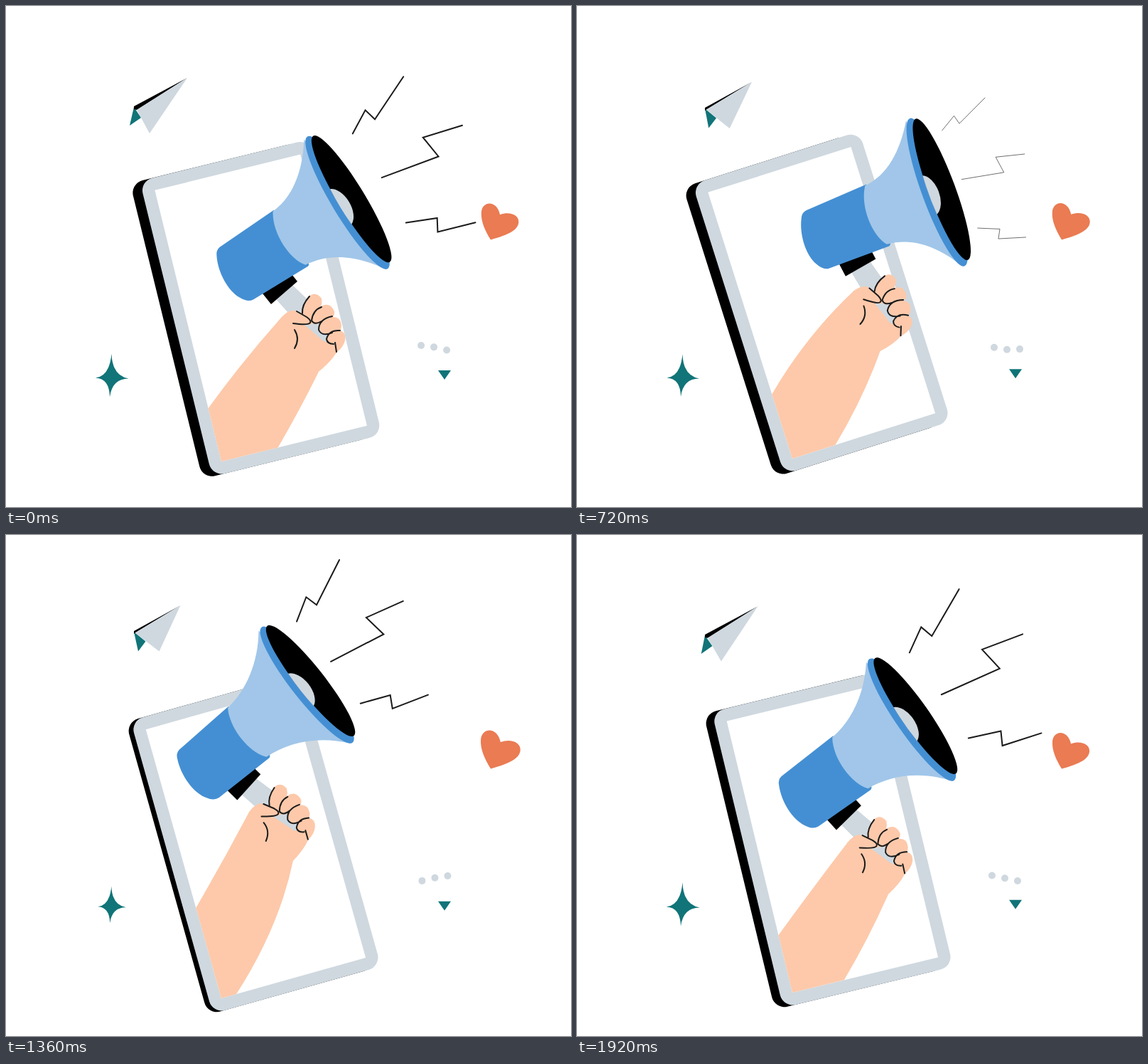
Recreate the animation shown at these times as an HTML page. Size 795 by 704 pixels, loop 2 s.

```html
<!DOCTYPE html>
<html lang="en">
<head>
<meta charset="utf-8">
<title>Megaphone</title>
<style>
  html, body { margin: 0; width: 100%; height: 100%; overflow: hidden; background: #fff; }
  svg { display: block; width: 795px; height: 704px; }
  .gray { fill: #cfd8df; }
  .blue { fill: #448fd3; }
  .sky { fill: #a1c6e9; }
  .skin { fill: #fdc9aa; }
  .teal { fill: #107478; }
  .coral { fill: #ea7b53; }
  .white { fill: #fff; }
  .ink { fill: none; stroke: #1b1b1b; stroke-width: 2; stroke-linecap: round; stroke-linejoin: round; }
  #bolts { stroke-linejoin: miter; }
</style>
</head>
<body>
<svg viewBox="0 0 795 704">
  <g id="plane">
    <path id="fold" class="teal"/>
    <path id="edge"/>
    <path id="wing" class="gray"/>
  </g>
  <path id="star" class="teal" d="M1-33Q2-2 25 2Q2 2-1.500 28Q-2 2-21.500 1Q-2-1 1-33Z"/>
  <g id="dots" class="gray"><circle r="5"/><circle r="5"/><circle r="5"/></g>
  <path id="arrow" class="teal" d="M608 0H626L617 13Z"/>
  <path id="heart" class="coral" d="M0 0C-8-13-14-26-13-39C-11-55 9-55 13-35C26-40 40-35 39-24C38-14 26-7 0 0Z"/>

  <!-- The origin is the lower left corner of the screen -->
  <g id="phone">
    <rect id="side" x="-17.500" y="-410" width="246" height="427.500" rx="18"/>
    <rect class="gray" x="-17.500" y="-410" width="246" height="427.500" rx="18"/>
    <rect class="white" y="-392.500" width="211" height="392.500"/>
  </g>

  <path id="arm" class="skin"/>
  <g id="hand">
    <path class="gray" d="M380 412L402 391L428 416L418 440L405 440Z"/>
    <path d="M361 404L402 377L410 387L373 419Z"/>
    <path class="skin" d="M387 438Q400 424 409 429L417 432Q416 419 426 408Q436 400 444 411Q445 417 443 422Q456 415 462 429Q463 433 460 437Q471 437 472 449Q472 453 470 456Q479 459 477 470Q475 479 465 487Q458 499 441 513L400 500Z"/>
    <path class="gray" d="M420 448Q429 448 431 446Q435 448 441 446Q440 457 447 461L454 462Q449 470 453 472Q447 473 441 466Z"/>
    <path class="ink" d="M427 408Q416 420 417 432M409 429L423 437Q430 442 428 445Q426 449 404 446M406 455Q414 468 406 481
      M444 423Q432 427 430 442Q434 449 444 443M459 436Q440 440 440 455Q444 465 459 459
      M470 456Q454 455 451 468Q452 475 461 475M463 473L465 486"/>
  </g>

  <!-- The origin is the joint of body and cone, the axis points right -->
  <g id="horn">
    <path class="blue" d="M2-46L-90-41Q-97-40-100-33C-111-12-112 18-103 34Q-97 46-88 46.500L2 46.500Q7 45 5 38Z"/>
    <path id="cone" class="sky"/>
    <g id="rim">
      <ellipse class="blue ring" cx="-2" cy="-1" rx="21"/>
      <ellipse class="ring" cx="5.500" cy="-2.500" rx="19"/>
      <path class="gray" d="M-13-30A18 30 0 0 1-13 28Q-15 0-13-30Z"/>
    </g>
    <g id="bolts" class="ink"><path/><path/><path/></g>
  </g>
</svg>
<script>
const LOOP = 2000, STEP = 80;
const KEYS = [0, 400, 720, 1040, 1360, 1760, 1920, LOOP];
const $ = id => document.getElementById(id);
const set = (el, name, value) => el.setAttribute(name, value);
const wave = (t, peak, period = LOOP) => Math.cos(2 * Math.PI * (t - peak) / period);

// A sine through the key poses; the remainder is blended between them.
function curve(peak, values) {
  const high = Math.max(...values), low = Math.min(...values);
  const base = t => (high + low) / 2 + (high - low) / 2 * wave(t, peak);
  const rest = KEYS.map((k, i) => values[i % values.length] - base(k));
  return t => {
    const i = KEYS.findIndex(k => k > t) - 1;
    const f = (t - KEYS[i]) / (KEYS[i + 1] - KEYS[i]);
    return base(t) + rest[i] + (rest[i + 1] - rest[i]) * f;
  };
}

const motion = {
  x: curve(425, [399, 435.5, 421, 369, 340, 366, 385]),
  y: curve(155, [327, 322.5, 294.5, 272, 278, 309, 321]),
  angle: curve(560, [-31.3, -20, -20.3, -29.6, -38.3, -38.4, -35]),
  tilt: curve(1870, [-13.8, -15.6, -17.6, -17.2, -15.7, -13.6, -13.6]),
  base: curve(1450, [640, 632, 636, 643, 651, 648, 643]),
  depth: curve(300, [14, 16, 14, 8, 7, 9, 12]),
  armTop: curve(1250, [77, 72, 95, 124, 132, 98, 83]),
  armFoot: curve(250, [82, 88, 63.5, 24.5, 22, 60.6, 75]),
  star: curve(350, [1, 1.12, 0.98, 0.87, 0.85, 0.94, 1.01]),
  plane: curve(1020, [0, 0.3, 0.75, 1, 0.8, 0.25, 0.05]),
  planeY: curve(500, [142, 145, 144, 138, 136, 138, 141])
};

const BOLTS = [
  { v: -80, points: [[87, 0], [121, -20], [126, -1], [195, -33]] },
  { v: -6, points: [[90, 0], [178, 17], [173, -19], [232, -4]] },
  { v: 66, points: [[86, 0], [129, 18], [119, 36], [174, 53]] }
];
const REST = { x: 399, y: 327, angle: -31.3 };

function turn([x, y], degrees, [cx, cy]) {
  const a = degrees * Math.PI / 180, c = Math.cos(a), s = Math.sin(a);
  return [cx + x * c - y * s, cy + x * s + y * c];
}
const middle = (p, q) => [(p[0] + q[0]) / 2, (p[1] + q[1]) / 2];
const poly = points => 'M' + points.join('L');

function drawPlane(t) {
  const k = motion.plane(t), y = motion.planeY(t);
  const at = (dx, dy) => [180 + dx, y + dy];
  const tip = at(75 - 12 * k, -41 + 5 * k), inner = at(4 - 3 * k, 4 - 3 * k);
  set($('fold'), 'd', poly([at(0, 0), at(-6 + 15 * k, 26 + 2 * k), at(10 + 8 * k, 15 - 2 * k)]) + 'Z');
  set($('edge'), 'd', poly([at(0, -1), tip, inner, at(0, 3)]) + 'Z');
  set($('wing'), 'd', poly([inner, tip, at(22 + 17 * k, 37 - 12 * k)]) + 'Z');
}

function drawTrinkets(t) {
  set($('star'), 'transform', `translate(147.500 521.500) scale(${motion.star(t)})`);
  set($('heart'), 'transform', `translate(682 328.500) scale(${1.035 + 0.035 * wave(t, 390, 1000)})`);
  set($('arrow'), 'transform', `translate(0 ${512.2 + 2.8 * wave(t, 1480)})`);
  [...$('dots').children].forEach((dot, i) => {
    set(dot, 'cx', 585.5 + 18 * i + 1.6 * wave(t, 850));
    set(dot, 'cy', 481 + 3 * wave(t, 1560) + 4.6 * wave(t, 520 + 150 * i, 1000));
  });
}

function drawPhoneAndArm(t, joint, angle) {
  const corner = [303, motion.base(t)], tilt = motion.tilt(t);
  set($('phone'), 'transform', `translate(${corner}) rotate(${tilt})`);
  set($('side'), 'transform', `translate(${-motion.depth(t)} 0)`);

  const swing = angle - REST.angle, foot = motion.armFoot(t);
  const onHand = (x, y) => turn([x - REST.x, y - REST.y], swing, joint);
  const top = turn([0, -motion.armTop(t)], tilt, corner);
  const bottom = turn([foot, 0], tilt, corner);
  const thumb = onHand(388, 437), wrist = onHand(441, 512);
  const upper = middle(thumb, top), lower = middle(wrist, bottom);
  const bulge = 3 + swing * 0.6;
  set($('arm'), 'd', `M${thumb}Q${upper[0] - bulge} ${upper[1] - bulge} ${top}L${corner}L${bottom}` +
    `Q${lower[0] + (90 - foot) / 3.3} ${lower[1]} ${wrist}L${onHand(455, 490)}L${onHand(410, 440)}Z`);
  set($('hand'), 'transform', `translate(${joint}) rotate(${swing}) translate(${-REST.x} ${-REST.y})`);
}

function drawHorn(t, joint, angle) {
  set($('horn'), 'transform', `translate(${joint}) rotate(${angle})`);
  const squash = wave(t, 125, 500);
  const length = 98 - 11.5 * squash, half = 108.7 + 5.5 * squash;
  const end = length - 8, bend = length * 0.67;
  set($('cone'), 'd', `M0-45C35-48 ${bend} ${-0.66 * half} ${end} ${-half}L${end + 4} ${half - 1}` +
    `C${bend} ${0.6 * half} 35 46 0 43C-15 25-17-20 0-45Z`);
  set($('rim'), 'transform', `translate(${length} 0)`);
  document.querySelectorAll('.ring').forEach((ring, i) => set(ring, 'ry', half - 5 * i));

  const scale = 0.83 + 0.175 * wave(t, 435, 500);
  $('bolts').style.strokeWidth = Math.min(2, 18 * (scale - 0.64));
  BOLTS.forEach(({ v, points }, i) => {
    set($('bolts').children[i], 'd', poly(points.map(([px, py]) => [70 + px * scale, v + py * scale])));
  });
}

function draw(t) {
  const joint = [motion.x(t), motion.y(t)], angle = motion.angle(t);
  drawPlane(t);
  drawTrinkets(t);
  drawPhoneAndArm(t, joint, angle);
  drawHorn(t, joint, angle);
}

const start = performance.now();
function tick() {
  const t = (performance.now() - start) % LOOP;
  draw(Math.floor(t / STEP) * STEP);
  requestAnimationFrame(tick);
}
tick();
</script>
</body>
</html>
```
